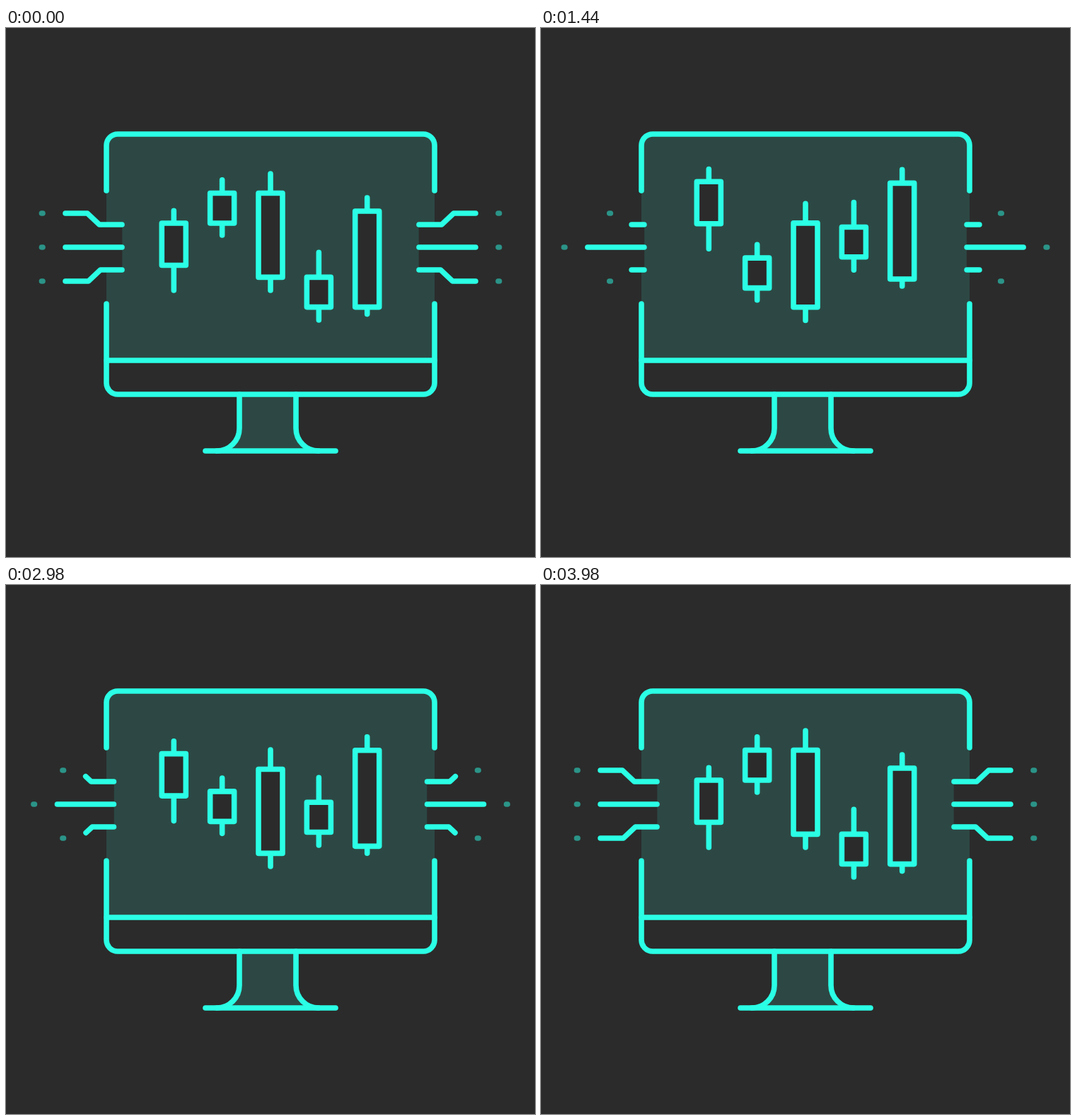
Write an HTML page that moves like this. It is 748 px wide and 748 px high and loops after 4 s.

```html
<!DOCTYPE html>
<html lang="en">
<head>
<meta charset="utf-8">
<title>Trading monitor</title>
<style>
  html, body { margin: 0; width: 100%; height: 100%; overflow: hidden; background: #2b2b2b; }
  svg { display: block; width: 100%; height: 100%; }
  .line { fill: none; stroke: #2affe5; stroke-width: 7.6; stroke-linecap: round; stroke-linejoin: round; }
  .tint { fill: #2d4844; }
  .candle { fill: #2b2b2b; }
  .dot { stroke: #2b9488; }
</style>
</head>
<body>
<svg viewBox="0 0 748 748">
  <path id="screen" class="tint"/>
  <path class="tint" d="M330 518V566A32 32 0 0 1 298 598H442A32 32 0 0 1 410 566V518Z"/>
  <g class="line">
    <path d="M142 230V166A16 16 0 0 1 158 150H590A16 16 0 0 1 606 166V230"/>
    <path d="M142 390V502A16 16 0 0 0 158 518H590A16 16 0 0 0 606 502V390"/>
    <path d="M142 470H606"/>
    <path d="M330 518V566A32 32 0 0 1 298 598"/>
    <path d="M410 518V566A32 32 0 0 0 442 598"/>
    <path d="M282 598H466"/>
  </g>
  <g id="candles" class="line"></g>
  <g id="left" class="line"></g>
  <g id="right" class="line" transform="translate(748) scale(-1 1)"></g>
</svg>
<script>
const LOOP = 4000;
const SLIDE = -22.4;      // outward travel of the connectors
const DOT_INWARD = 57.3;  // travel of the upper and lower dots
const TRIM = 0.982;       // share of a bent connector that gets trimmed

const byId = id => document.getElementById(id);

function add(parent, d, className = '') {
  const path = document.createElementNS('http://www.w3.org/2000/svg', 'path');
  path.setAttribute('d', d);
  path.setAttribute('class', className);
  parent.appendChild(path);
  return path;
}

const shift = (el, x, y) => el.setAttribute('transform', `translate(${x} ${y})`);

// wick top, body top, body bottom, wick bottom, vertical travel
const candles = [
  [258.2, 276, 335.5, 371, -72.6],
  [214.7, 233.5, 276, 293, 113.3],
  [206, 233.5, 352.4, 371, 52.4],
  [317.3, 352.4, 394.6, 413, -87.6],
  [240, 259, 394.6, 404.6, -49]
].map(([high, top, bottom, low, travel], i) => {
  const x = 237.3 + i * 68.35;
  const d = `M${x - 17} ${top}h34V${bottom}h-34ZM${x} ${high}V${top}M${x} ${bottom}V${low}`;
  return { el: add(byId('candles'), d, 'candle'), travel };
});

const sides = ['left', 'right'].map(id => {
  const group = byId(id);
  const dot = y => add(group, `M50.4 ${y}h1.6`, 'dot');
  const bent = ['M164 278H132L115 262H84', 'M164 342H133.5L116.5 358H84'].map(d => {
    const el = add(group, d);
    return { el, length: el.getTotalLength() };
  });
  return {
    bent,
    straight: [add(group, 'M84 310H164'), dot(310)],
    dots: [dot(262), dot(358)]
  };
});

function draw(time) {
  const phase = (time % LOOP) / LOOP;
  const s = 1 - Math.abs(1 - 2 * phase);
  const p = s * s * (3 - 2 * s);
  const dx = SLIDE * p;

  for (const { el, travel } of candles) shift(el, 0, travel * p);

  for (const { bent, straight, dots } of sides) {
    for (const { el, length } of bent) {
      shift(el, dx, 0);
      el.setAttribute('stroke-dasharray', `${length * (1 - TRIM * p)} 200`);
    }
    for (const el of straight) shift(el, dx, 0);
    for (const el of dots) shift(el, DOT_INWARD * p, 0);
  }

  const inner = 164.3 + dx;
  byId('screen').setAttribute('d',
    `M142 470V342H${inner}V278H142V166A16 16 0 0 1 158 150H590A16 16 0 0 1 606 166` +
    `V278H${748 - inner}V342H606V470Z`);
}

let start;
function tick(now) {
  start ??= now;
  draw(now - start);
  requestAnimationFrame(tick);
}
draw(0);
requestAnimationFrame(tick);
</script>
</body>
</html>
```
